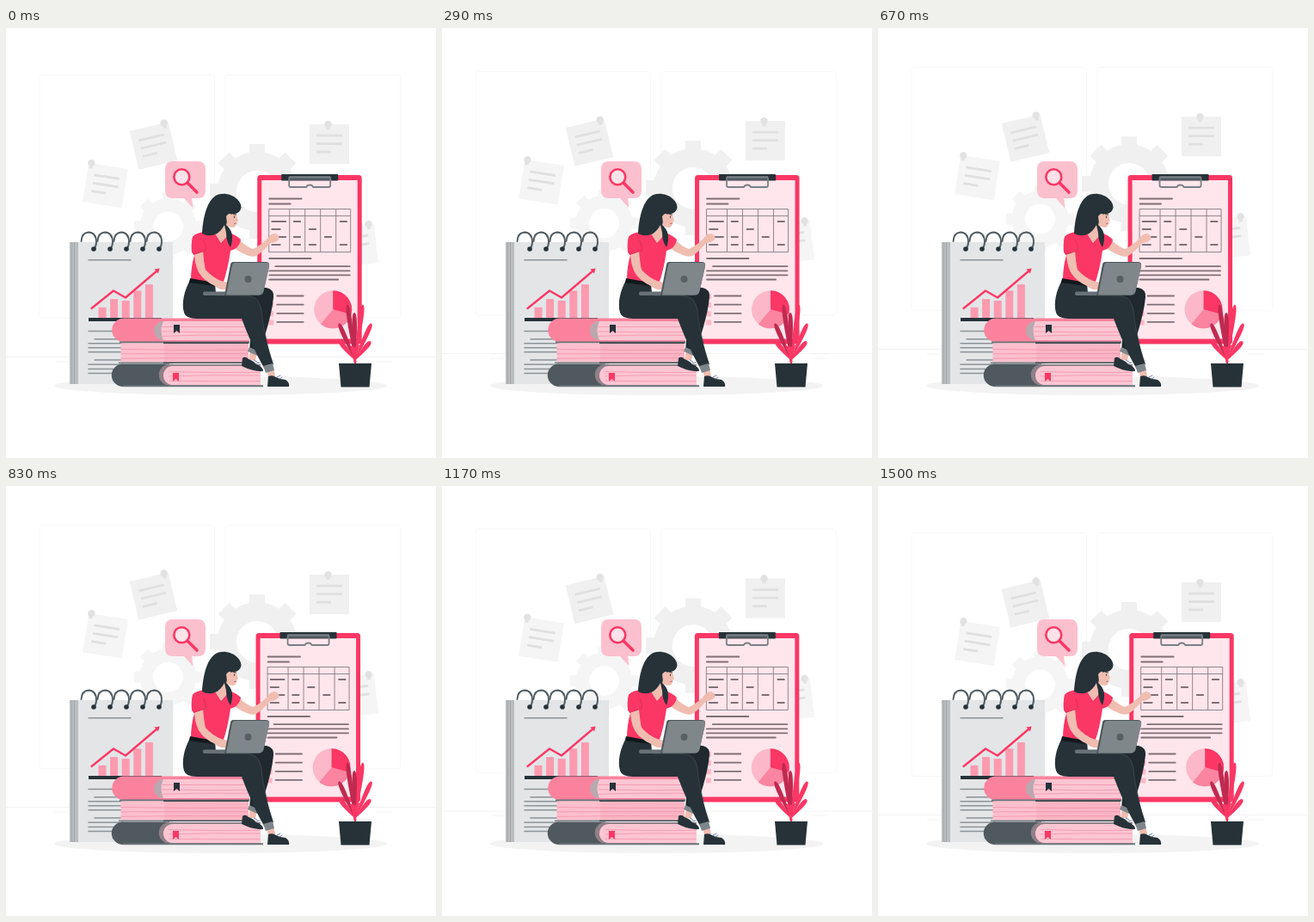
These frames come from a looping animation (500 by 500 pixels, 1540 ms). An HTML page:

```html
<!DOCTYPE html>
<html lang="en">
<head>
<meta charset="utf-8">
<title>Planning</title>
<style>
html, body { margin: 0; width: 100%; height: 100%; overflow: hidden; background: #fff; }
svg { display: block; width: 100vw; height: 100vh; }
.red { fill: #fa3765; }
.ink { fill: #263238; }
.skin { fill: #f0bdb1; }
.pale { fill: #fcc5d2; }
.cuff { fill: #7d868b; }
.line { fill: none; stroke-linecap: round; stroke-linejoin: round; }
</style>
</head>
<body>
<svg viewBox="0 0 500 500">
  <g id="back">
    <g fill="none" stroke="#f3f3f3" stroke-width=".6">
      <path d="M0 382.5H500M57 388H73M430 388H448M398 396H424" stroke="#ebebeb"/>
      <rect x="39" y="54.5" width="203.5" height="283" rx="3"/>
      <rect x="255" y="54.5" width="203.5" height="283" rx="3"/>
    </g>
    <g id="gears"></g>
    <g id="notes"></g>
  </g>

  <ellipse cx="249.500" cy="416" rx="193.500" ry="11" fill="#f3f3f3"/>

  <g id="pad">
    <rect x="74" y="249" width="11" height="165" fill="#b9bdbf"/>
    <path d="M76.500 249V414M79.500 249V414" stroke="#989ea1" stroke-width=".7"/>
    <rect x="84" y="249" width="110" height="165" fill="#e3e5e7"/>
    <path id="padText" class="line" stroke="#8d9397" stroke-width="1.500"/>
    <g id="bars" fill="#fc9ab0"></g>
    <rect x="96" y="337" width="85" height="4" class="ink"/>
    <path class="line" d="M99.500 326L125 305.500L139 313.500L176 282" stroke="#fa3765" stroke-width="2.300"/>
    <path class="red" d="M178.500 279.500L177 285.500L172.500 280.500Z"/>
    <g id="rings"></g>
  </g>

  <g id="board">
    <rect class="red" x="292" y="171" width="121.500" height="196.500" rx="3.500"/>
    <rect x="297" y="177" width="111.500" height="184.500" fill="#ffe6ec"/>
    <rect class="ink" x="320" y="170" width="66" height="7.500" rx=".8"/>
    <rect x="329" y="172" width="48" height="5" fill="#4f5a5f"/>
    <path class="line" d="M330 173.500H376Q377 173.500 377 175V183Q377 185 375 185H357Q356 182.500 353 182.500T349 185H331Q329 185 329 183V175Q329 173.500 330 173.500Z" stroke="#788085" stroke-width="1.800"/>
    <path id="grid" fill="none" stroke="#8b7b82" stroke-width=".9"/>
    <path id="boardText" class="line" stroke="#806f77" stroke-width="1.800"/>
    <g id="legend" fill="#fcb8c8"></g>
    <g id="pie"></g>
  </g>

  <g id="books">
    <path d="M137 337.500H283V365H137A13.500 13.500 0 0 1 137 337.500Z" fill="#fb829d"/>
    <path class="pale" d="M184 341H283V363H184A11 11 0 0 1 184 341Z"/>
    <path d="M183 341A11 11 0 0 0 183 363Q178 352 183 341Z" fill="#b9a8ae"/>
    <path d="M132 365.500H283" stroke="#6b7377" stroke-width="1.800"/>

    <rect x="133.500" y="366.500" width="51" height="22" fill="#fdbfcd"/>
    <rect x="184" y="366.500" width="98" height="22" fill="#fab5c4"/>
    <path d="M183 366.300H282M183 389.300H284" stroke="#39444a" stroke-width="1.600"/>
    <path d="M131 389.300H183" stroke="#7b8388" stroke-width="1.600"/>

    <path d="M136 390.500H190V417H136A13.200 13.200 0 0 1 136 390.500Z" fill="#4f595e"/>
    <path d="M190 391H296V415.500H190A11.500 11.500 0 0 1 190 391Z" fill="#8f8088"/>
    <path class="pale" d="M194 393H296V415H194A11 11 0 0 1 194 393Z"/>
    <path d="M136 416.300H299" stroke="#6b7377" stroke-width="2"/>

    <path id="pages" class="line" stroke="#ee8fa5" stroke-width=".7"/>
    <path class="ink" d="M195 345h7v10l-3.500-3l-3.500 3z"/>
    <path class="red" d="M194 401h7v10l-3.500-3l-3.500 3z"/>
  </g>

  <g id="woman">
    <!-- far leg and shoe -->
    <path d="M268 301L303 302Q312 304 311 313C309 335 300 362 293 380L283 376L286 335Z" fill="#1f292e"/>
    <path class="skin" d="M284 374L292 378L290 386L282 386Z"/>
    <path class="cuff" d="M283 371L294 376L292 381L281 376Z"/>
    <path class="ink" d="M275 384Q278 381 282 385Q288 387 291 391Q299 394 299 399Q288 400 274 393Z"/>
    <path class="line" d="M288 386l4 2M291 390l4 -1" stroke="#6e7ea5" stroke-width="1"/>
    <!-- near leg and shoe -->
    <path class="skin" d="M303 396L311 395L313 405L305 407Z"/>
    <path class="ink" d="M214 293C207 306 204 320 207 331Q209 338 222 338H274C280 354 290 378 300 395L311 391C305 372 299 351 297 328Q296 312 281 311L244 309L243 296Z"/>
    <path class="line" d="M246 311L281 311.500Q294 312 297 328Q298 344 304 366" stroke="#465158" stroke-width=".6"/>
    <path class="cuff" d="M299 393L310 390L312 398L302 401Z"/>
    <path class="ink" d="M305 405Q310 403 314 406Q319 409 325 409Q330 412 329 417H304Z"/>
    <path class="line" d="M315 406l4 -2M318 408l3 -2" stroke="#6e7ea5" stroke-width="1"/>
    <!-- pointing arm -->
    <path class="skin" d="M264 251L272 247Q279 254 287 257Q296 253 304 245Q307 239 313 239Q319 241 317 246Q313 250 307 250Q299 260 291 265Q286 267 280 264Q270 260 264 255Z"/>
    <!-- shirt -->
    <path class="red" d="M232 237Q220 238 217 243Q215 251 216 261L219 264Q215 278 215 293L240 298L252 298Q258 281 261 259L266 257Q272 253 273 246Q268 241 260 238L250 249L243 237Z"/>
    <path class="skin" d="M241 236L256 226L259 240L250 250Z"/>
    <path d="M214 291L242 296V300L213 296Z" fill="#11181c"/>
    <rect x="239" y="294" width="3" height="4" fill="#e8d4cf"/>
    <!-- head -->
    <path class="skin" d="M254 208H269L268 218L270 224L268 226Q268 232 263 232L256 230Z"/>
    <path class="ink" d="M228 239C229 220 234 198 247 193.500C261 190 274 200 273.500 209Q272 215 266 216Q260 215 258 222L256 229Q267 238 261 255Q256 248 256 238L254 229Q249 238 243 240Q236 243 228 239Z"/>
    <path class="skin" d="M256 219Q261 213 262 218Q262 224 257 227Z"/>
    <path class="line" d="M265.500 219v1.500M264.500 216.500l3 .5" stroke="#263238" stroke-width=".9"/>
    <path class="line" d="M265.500 227.500l2.500 -.5" stroke="#c25b61" stroke-width=".8"/>
    <!-- laptop and resting arm -->
    <rect x="229" y="306.500" width="54" height="4.500" rx="2" fill="#687176"/>
    <path class="skin" d="M219 261L229 258Q230 273 232 281Q240 290 250 294L258 296Q261 299 256 304Q248 305 243 300Q230 294 224 284Q219 274 219 261Z"/>
    <path class="red" d="M217 243Q223 236 230 243L232 259L218 264Q215 253 217 243Z"/>
    <path class="line" d="M230 247Q233 254 232 259L219 263" stroke="#cc2950" stroke-width=".6"/>
    <path d="M264 272H302Q307 272 306 277L299.500 306Q298.500 311 293 311H254L261 275Q261.500 272 264 272Z" fill="#4d575c"/>
    <path d="M266 273H303Q306.500 273 306 277L299.500 306Q298.500 310.500 293 310.500H256L263 276Q263.500 273 266 273Z" fill="#7f878a"/>
    <circle cx="281.500" cy="292" r="4" fill="#566065"/>
  </g>

  <g id="bubble">
    <path d="M194 155H223Q232 155 232 164V189Q232 198 223 198H216L217.500 209.500L207 198H194Q185 198 185 189V164Q185 155 194 155Z" fill="#fbc0ce"/>
    <circle cx="204.300" cy="173.300" r="9" fill="#fde3e9" stroke="#fa3765" stroke-width="2.600"/>
    <path class="line" d="M211 180L222 191" stroke="#fa3765" stroke-width="3.600"/>
  </g>

  <g id="plant">
    <g id="fronds"></g>
    <path class="ink" d="M387 390H425L422.500 417.500H389.500Z"/>
  </g>
</svg>
<script>
const RED = '#fa3765', WINE = '#c02a50';
const el = id => document.getElementById(id);
const range = n => [...Array(n).keys()];
const fill = (id, rows, draw) => { el(id).innerHTML = rows.map(draw).join(''); };
const dash = (x, y, w) => `M${x} ${y}h${w}`;

// four lines of text: first one indented, last one short
const paragraph = (x, y, w, gap, indent, short) => range(4).map(i => {
  const inset = i ? 0 : indent;
  return dash(x + inset, y + i * gap, w - inset - (i > 2 ? short : 0));
}).join('');

function gear(x, y, size, color) {
  const tooth = size / 6, body = size * .835, hole = size * .44;
  const teeth = range(8).map(i =>
    `<rect x="${-tooth}" y="${-size}" width="${2 * tooth}" height="${size - body + 4}" transform="rotate(${i * 45})"/>`);
  return `<g transform="translate(${x} ${y})" fill="${color}">${teeth.join('')}
    <circle r="${(body + hole) / 2}" fill="none" stroke="${color}" stroke-width="${body - hole}"/></g>`;
}
el('gears').innerHTML = gear(292, 190, 55, '#f0f0f0') + gear(188.5, 231, 39.5, '#f5f5f5');

function note(x, y, tilt, pin, color) {
  return `<g transform="translate(${x} ${y}) rotate(${tilt})">
    <rect x="-23" y="-23" width="46" height="46" fill="${color}"/>
    <path d="M-15 -10H15M-15 -.5H15M-15 9H2" stroke="#e0e0e0" stroke-width="2.800"/>
    <circle cx="${pin}" cy="-23" r="4.200" fill="#e2e2e2"/>
    <path d="M${pin - 2} -20h4v3h-4z" fill="#e2e2e2"/></g>`;
}
el('notes').innerHTML = note(115.5, 183, 9, -20, '#f5f5f5') + note(171.5, 137, -13.5, 18, '#f0f0f0')
  + note(376, 135, 0, -1.5, '#f0f0f0') + note(407.5, 253, -7, 17, '#f5f5f5');

// notepad
el('padText').setAttribute('d', dash(96, 269.7, 49) + dash(96, 352.5, 34)
  + paragraph(96, 361.8, 40, 5, 7, 0) + paragraph(96, 386, 40, 5.2, 7, 0));

fill('bars', range(5), i => {
  const h = 12.2 + 6 * i + 4.5 * Math.sin(2.2 * i);
  return `<rect x="${107.5 + i * 13.6}" y="${337 - h}" width="9" height="${h}"/>`;
});

fill('rings', range(5), i => `<g transform="translate(${i * 19} 0)">
  <path class="line" d="M87.500 248Q88 238 96 237.500Q105 238 105 249Q105 254 102 257" stroke="#525c62" stroke-width="1.900"/>
  <circle class="ink" cx="102" cy="257" r="2.800"/></g>`);

// clipboard
const column = i => 329.5 + 18 * (i - 1);
el('grid').setAttribute('d', 'M305.500 210.500h95v50h-95zM305.500 218.500h95'
  + range(4).map(i => `M${column(i + 1)} 210.500v50`).join(''));

const filled = ['11001', '10100', '11010', '11101'];
const marks = filled.map((cells, r) => [...cells].map((on, c) => {
  const y = 225 + 9 * r;
  if (on === '0') return '';
  return c ? dash(column(c) + 5, y, 7.5) : dash(309, y, r % 2 ? 9.5 : 16);
}).join('')).join('');
const legendY = i => 311.5 + i * 10.15;
el('boardText').setAttribute('d', marks + dash(306, 198.5, 37.5) + dash(306, 204.5, 24.5)
  + dash(306, 268, 48.5) + paragraph(306, 277.2, 93.5, 5.1, 7, 13.5)
  + range(4).map(i => dash(315, legendY(i), 30.5)).join(''));
fill('legend', range(4), i => `<rect x="305" y="${legendY(i) - 2.5}" width="6" height="6"/>`);

function slice(from, to, color) {
  const at = deg => {
    const a = deg * Math.PI / 180;
    return `${380 + 22 * Math.cos(a)} ${327.3 + 22 * Math.sin(a)}`;
  };
  return `<path fill="${color}" d="M380 327.300L${at(from)}A22 22 0 0 1 ${at(to)}Z"/>`;
}
el('pie').innerHTML = '<circle cx="380" cy="327.300" r="22" fill="#fcb8c8"/>'
  + slice(15, 130, '#fb84a0') + slice(-90, 15, RED);

// three page edges in each of three books
el('pages').setAttribute('d', range(9).map(i => {
  const book = Math.floor(i / 3), y = 347.5 + 26 * book + 5.4 * (i % 3);
  const x = [182, 134, 190][book], end = book === 2 ? 295 : 281, bend = 2 * Math.sin(i * 2.4);
  return `M${x} ${y}Q${(x + end) / 2} ${y + bend} ${end} ${y + bend / 2}`;
}).join(''));

// leaves fan out from one root, shorter the more they lean
const frond = (lean, n, color) => `<path transform="translate(406 386) rotate(${lean})" fill="${color}"
  d="M0 4C-2 ${-n * .4} -5 ${-n} 0 ${-n}C5 ${-n} 2 ${-n * .4} 0 4Z"/>`;
fill('fronds', range(6), i => {
  const lean = 16 * (i - 2.5);
  return frond(lean, 74 - 1.15 * Math.abs(lean), lean < 0 && i ? WINE : RED);
});
el('fronds').innerHTML += frond(-1, 55, WINE)
  + `<path fill="${RED}" d="M405 390Q403 378 399 368Q406 374 412 367Q407 380 407 390Z"/>`;

const LOOP = 1540, STEPS = 37, FPS = 24;

function pose(ms) {
  const step = Math.floor((ms % LOOP + 3) * STEPS / LOOP) % STEPS;
  const t = step / FPS;
  const rise = 10 * (1 - Math.abs(t / .75 - 1));
  const sway = .2 + 1.9 * Math.sin(2 * Math.PI * t);
  el('back').setAttribute('transform', `translate(0 ${-rise})`);
  el('board').setAttribute('transform', `translate(${sway} 0)`);
}

const start = performance.now();
function tick() {
  pose(performance.now() - start);
  requestAnimationFrame(tick);
}
tick();
</script>
</body>
</html>
```
